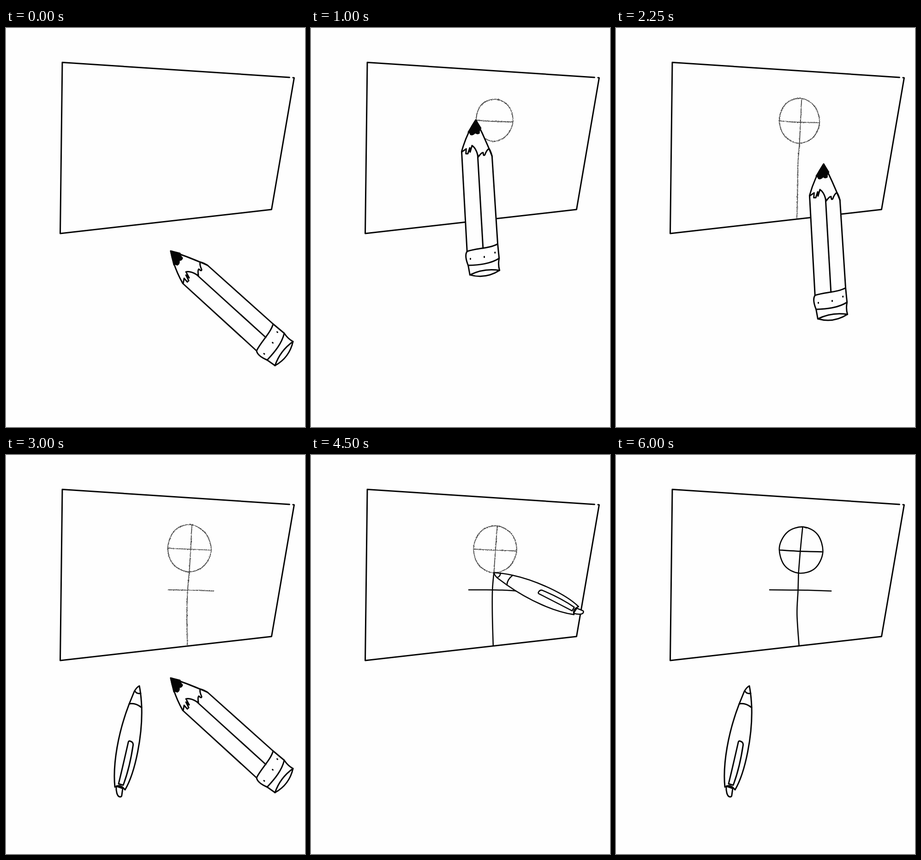
An HTML page that plays this animation: 648x864 px, repeating every 6.5 s.

```html
<!DOCTYPE html>
<html lang="en">
<head>
<meta charset="utf-8">
<title>Pencil and pen sketch</title>
<style>
  html, body { margin: 0; width: 100%; height: 100%; overflow: hidden; background: #fefefe; }
  svg { display: block; width: 100vw; height: 100vh; }
  path { fill: none; stroke: #050505; stroke-width: 3; stroke-linecap: round; stroke-linejoin: round; }
  path.paper { fill: #fefefe; }
  path.solid { fill: #050505; }
  #graphite path { stroke: #4c4c4c; stroke-width: 1.9; }
  #ink path { stroke-width: 2.6; }
</style>
</head>
<body>
<svg viewBox="0 0 648 864">
  <defs>
    <filter id="grain" filterUnits="userSpaceOnUse" x="300" y="120" width="200" height="310" color-interpolation-filters="sRGB">
      <feTurbulence type="fractalNoise" baseFrequency=".45" numOctaves="2" seed="4"/>
      <feDisplacementMap in="SourceGraphic" scale="3" xChannelSelector="R" yChannelSelector="G"/>
    </filter>
  </defs>
  <path d="M614.5 107 L122 74.5 117.5 445 575.5 393 624.5 108 622 107.5"/>
  <g id="graphite" filter="url(#grain)"></g>
  <g id="ink"></g>
  <g id="pencil">
    <path class="paper" d="M357 483 Q397 496 437 514 L579 641 603 661 Q611 673 622 679 Q614 714 583 731 L566 719 Q545 710 543 699 L383 553 Q363 517 357 483Z"/>
    <path class="solid" d="M357 483 L377 488 Q378 495 382 498 Q381 503 375 503 Q376 511 371 513 Q366 510 364 513Z"/>
    <path d="M384 553 L386 542 393 550 396 547 390 535 397 541 390 528 Q400 526 413 534 L417 536 Q415 524 418 522 Q424 528 424 523 Q419 512 421 507 Q427 508 437 514"/>
    <path d="M413 534 L563 670"/>
    <path d="M579 641 C573 661 553 679 543 699 M603 661 C598 683 582 702 566 719 M622 679 Q594 699 583 731"/>
    <path d="M587.5 658 l1 1 M577.5 681 l1 1 M559 705 l1 1"/>
  </g>
  <g id="pen">
    <path class="paper" d="M239 717 C238 728 241 739 246 740 Q251 741 251 736 L253 722Z"/>
    <path class="paper" d="M289 500 Q283 503 278 512 L267 539 C243 601 231 670 236 719 Q247 711 258 725 C281 686 296 605 294 546 Q293 520 289 500Z"/>
    <path d="M280 512 Q284 518 292 516 M267 539 Q280 536 294 547"/>
    <path d="M265 622 Q266 618 270 620 Q276 622 275.5 628 Q268 678 254 715 L244 712 Q256 662 265 622Z"/>
  </g>
</svg>
<script>
const STEP = 250, LOOP = 6500, LAST = 24, PEN_ARRIVES = 12;
const PENCIL_HOME = [357, 483], PEN_HOME = [289, 500];
const $ = id => document.getElementById(id);
const between = (a, b, f) => a + (b - a) * f;
const clamp = f => Math.max(0, Math.min(1, f));
const swing = f => f ** 3 / (f ** 3 + (1 - f) ** 3);
const noise = n => { const v = Math.sin(n * 127.1) * 43758.5; return v - Math.floor(v) - .5; };

// Strokes in order; from and to are positions along the part, pace bends the speed.
const stroke = (tool, part, first, last, from, to, turnFrom, turnTo, pace = 1) =>
  ({ tool, part, first, last, from, to, turnFrom, turnTo, pace });
const strokes = [
  stroke("pencil", "circle", 1, 2, .77, 0, 30, 60),
  stroke("pencil", "across", 3, 4, 1, 0, 60, 44.5),
  stroke("pencil", "down", 5, 6, 0, 1, 44.5, 44.5),
  stroke("pencil", "body", 7, 8, 0, .76, 51, 65),
  stroke("pencil", "shoulders", 9, 10, 1, .13, 44.5, 30),
  stroke("pen", "body", 13, 15, 1, 0, 0, 0, .42),
  stroke("pen", "shoulders", 16, 17, 0, 1, 0, -63.5),
  stroke("pen", "down", 18, 19, 1, 0, -76, -162),
  stroke("pen", "across", 20, 20, 1, 0, 110, 110),
  stroke("pen", "circle", 20, 23, 0, 1, 115, 0, 1.5)
];

// The sketch is redrawn each step: it grows, sinks and wobbles a little.
function figure(step) {
  const growth = clamp((step - 4) / 8) ** 1.5;
  const rx = 40 + 7 * growth, ry = 46 + 5 * growth;
  const cx = 397 + .4 * Math.max(0, step - 14), cy = 198 + .32 * step;
  const chin = [398 - .15 * (step - 7), cy + ry];
  const left = 351 - 1.5 * (step - 12), right = 450 + 2.7 * Math.max(0, step - 18);
  const wobble = (x, y, seed) => [x + 2 * noise(step + seed), y + 2 * noise(step - seed)];
  const circle = Array.from({ length: 8 }, (_, i) => {
    const angle = i * Math.PI / 4 - .1;
    return wobble(cx - rx * Math.sin(angle), cy - ry * Math.cos(angle), i * 31);
  });
  return {
    circle: curve(circle, true),
    across: curve([[cx - rx, cy], wobble(cx - 10, cy + 2, 5), [cx + rx, cy + 4]]),
    down: curve([[402 + .15 * (step - 7), cy - ry + 1], wobble(400, cy, 7), chin]),
    body: curve([chin, wobble(394, 293, 9), wobble(393, 345, 11), [393 + .3 * (step - 12), 412]]),
    shoulders: curve([[left, 292], wobble(380, 292, 13), wobble(415, 293, 17), [right, 294.5]])
  };
}

function curve(points, closed) {
  const n = points.length;
  const at = i => closed ? points[(i + n) % n] : points[Math.max(0, Math.min(n - 1, i))];
  let d = "M" + points[0];
  for (let i = 0; i < (closed ? n : n - 1); i++) {
    const [p, q, r, s] = [at(i - 1), at(i), at(i + 1), at(i + 2)];
    const c1 = q.map((v, j) => v + (r[j] - p[j]) / 6);
    const c2 = r.map((v, j) => v - (s[j] - q[j]) / 6);
    d += `C${c1} ${c2} ${r}`;
  }
  return closed ? d + "l6 2" : d;
}

for (const s of strokes) {
  s.path = document.createElementNS("http://www.w3.org/2000/svg", "path");
  s.path.setAttribute("pathLength", 1);
  $(s.tool === "pen" ? "ink" : "graphite").append(s.path);
}

const progress = (s, step) => s.last > s.first ? clamp((step - s.first) / (s.last - s.first)) : 1;
const reach = (s, step) => between(s.from, s.to, progress(s, step) ** s.pace);

function showStroke(s, d, step) {
  const inked = s.tool === "pencil" &&
    strokes.some(o => o.tool === "pen" && o.part === s.part && step >= o.last);
  const u = reach(s, step);
  const done = step > s.last;
  const start = done ? 0 : Math.min(s.from, u);
  const end = done ? 1 : Math.max(s.from, u);
  s.path.style.visibility = step < s.first || inked || end === start ? "hidden" : "visible";
  s.path.setAttribute("d", d);
  s.path.setAttribute("stroke-dasharray", end - start < 1 ? `${end - start} 2` : "none");
  s.path.setAttribute("stroke-dashoffset", -start);
}

function place(tool, [homeX, homeY], x, y, turn, scale = 1) {
  $(tool).setAttribute("transform",
    `translate(${x} ${y}) rotate(${turn}) scale(${scale}) translate(${-homeX} ${-homeY})`);
}

function draw(time) {
  const step = Math.min(LAST, Math.floor(time % LOOP / STEP));
  const shapes = figure(step === PEN_ARRIVES - 1 ? PEN_ARRIVES : step);
  for (const s of strokes) showStroke(s, shapes[s.part], step);

  const away = Math.max(0, step - PEN_ARRIVES);
  place("pencil", PENCIL_HOME, PENCIL_HOME[0] + 105.5 * away, PENCIL_HOME[1] + 53 * away, -17 * Math.sqrt(away / 2));
  place("pen", PEN_HOME, ...PEN_HOME, 0);
  $("pen").style.display = step < PEN_ARRIVES ? "none" : "";

  const active = strokes.find(s => step >= s.first && step <= s.last);
  if (!active) return;
  const { x, y } = active.path.getPointAtLength(reach(active, step) * active.path.getTotalLength());
  const turn = between(active.turnFrom, active.turnTo, swing(progress(active, step)));
  if (active.tool === "pencil") place("pencil", PENCIL_HOME, x, y, turn);
  else place("pen", PEN_HOME, x, y, turn, 1 - .13 * clamp(Math.abs(turn) / 13));
}

const began = performance.now();
function tick() {
  draw(performance.now() - began);
  requestAnimationFrame(tick);
}
tick();
</script>
</body>
</html>
```
